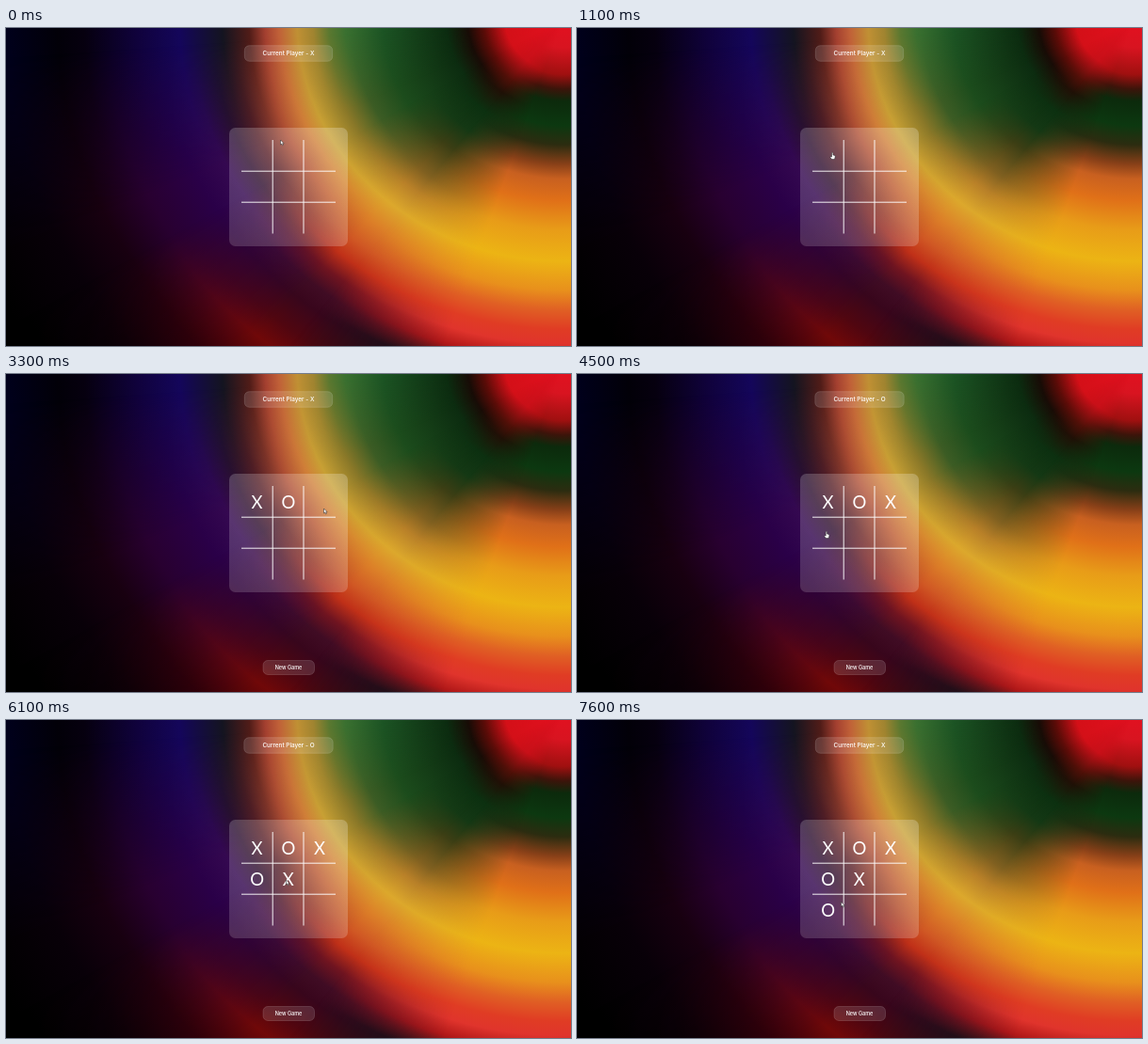
Recreate the animation shown at these times as an HTML page. Size 600 by 338 pixels, loop 8 s.

```html
<!DOCTYPE html>
<html lang="en">
<head>
<meta charset="utf-8">
<title>Noughts and crosses</title>
<style>
  html, body { margin: 0; width: 100%; height: 100%; overflow: hidden; background: #000; }
  #stage { position: relative; width: 600px; height: 338px; overflow: hidden; }
  #stage > * { position: absolute; inset: 0; }

  /* Elliptical colour rings, blended by direction from the top right */
  .ring {
    background: radial-gradient(566px 516px at 592px -10px, var(--stops));
    -webkit-mask-image: conic-gradient(at 592px -10px, var(--fade));
    mask-image: conic-gradient(at 592px -10px, var(--fade));
  }
  .left {
    --fade: #000, #000;
    --stops: #e41020 0%, #d41018 11%, #5c0c08 15%, #180c06 18%, #0c2c10 22%, #1c5424 34%,
      #3a7030 41%, #5a7830 44%, #a08430 47%, #c09034 50%, #c06038 53.5%, #a44030 56%,
      #501c18 59%, #141420 64%, #14065a 72%, #10023c 80%, #06000f 90%, #020008 95%, #00001c 105%;
  }
  .purple {
    --fade: #000 247deg, transparent 266deg;
    --stops: #e41020 0%, #d41018 11%, #5c0c08 15%, #180c06 18%, #0c2c10 22%, #1c4c1c 34%,
      #3c5c24 40%, #8a7828 45%, #c8a034 50%, #d08038 53%, #b05034 57%, #5a2028 62%,
      #301030 66%, #340850 70%, #2a0048 76%, #280030 86%, #180010 95%, #080008 105%, #000 120%;
  }
  .diagonal {
    --fade: #000 224deg, transparent 241deg;
    --stops: #e41020 0%, #c81018 11%, #501008 16%, #201006 19%, #0c3010 24%, #143814 29%,
      #3c3e14 34%, #806020 41%, #b88028 45%, #dca82c 50%, #dc8028 55%, #d05824 60%,
      #c03018 64%, #701420 68%, #400c24 72%, #38061c 76%, #500610 82%, #700808 87%,
      #380008 96%, #100006 108%, #000 120%;
  }
  .down {
    --fade: #000 200deg, transparent 220deg;
    --stops: #e41020 0%, #d81420 6%, #a01010 11.5%, #3c140a 14.5%, #0c2a0c 17%, #0c3810 22%,
      #2c2c10 26%, #884018 30%, #c86020 33%, #e07018 37.5%, #e89c18 43.5%, #ecb414 50%,
      #e8901c 56%, #e06024 60%, #e03c24 64%, #e0342c 67%, #b01818 70.5%, #101414 75%;
  }

  text { fill: #fff; text-anchor: middle; }
  .label { font: 500 6.4px Inter, sans-serif; }
  .small { font: 500 5.5px Inter, sans-serif; }
  .mark { font: 400 18.5px Lato, sans-serif; }
  .glass { fill: #fff; fill-opacity: .13; stroke: #fff; stroke-opacity: .2; stroke-width: .7; }
  .pointer { fill: #fff; stroke: #222; stroke-width: .5; }
</style>
</head>
<body>
<div id="stage">
  <div class="ring left"></div>
  <div class="ring purple"></div>
  <div class="ring diagonal"></div>
  <div class="ring down"></div>
  <svg width="600" height="338" viewBox="0 0 600 338">
    <defs>
      <linearGradient id="sheen" x1="0" y1="1" x2="1" y2="0">
        <stop offset="0" stop-color="#fff" stop-opacity=".16"/>
        <stop offset="1" stop-color="#fff" stop-opacity=".23"/>
      </linearGradient>
    </defs>
    <rect id="pill" class="glass" y="18.7" height="16.6" rx="5"/>
    <text id="status" class="label" x="300" y="29.2"></text>
    <rect x="237" y="106" width="126" height="126" rx="6.5" fill="url(#sheen)"/>
    <path d="M283.2 119V218.5M316 119V218.5M250 152.2H350M250 185.2H350" stroke="#fff" stroke-opacity=".92"/>
    <g id="marks"></g>
    <g id="newGame">
      <rect class="glass" x="273" y="304.5" width="54.5" height="15" rx="5"/>
      <text class="small" x="300" y="313.9">New Game</text>
    </g>
    <path id="arrow" class="pointer" d="M0 0V5L1.2 4 2 5.8 2.9 5.4 2.1 3.7H3.6Z"/>
    <path id="hand" class="pointer" d="M-.8 -3.2Q0 -4.2.6 -3.2V-1L2.5 -.5Q3 -.2 2.9 1L2.2 3.6H-.8L-2.4 1.2Q-2.4 .2-.8 1Z"/>
  </svg>
</div>
<script>
const LOOP = 8000;

// [time, player, column, row]
const moves = [
  [1300, "X", 0, 0], [2300, "O", 1, 0], [3900, "X", 2, 0],
  [5000, "O", 0, 1], [6100, "X", 1, 1], [7400, "O", 0, 2]
];

// [time, x, y, shape]; the pointer jumps from one place to the next
const steps = [
  [0, 291.5, 119, "arrow"], [200, 288, 122, "arrow"], [300, 284, 127, "arrow"],
  [700, 279, 132, "hand"], [800, 275, 135, "hand"], [900, 272, 136, "hand"],
  [1100, 271.3, 136, "hand"], [1300, 270, 136, "arrow"], [1800, 277, 138, "arrow"],
  [2100, 288, 140, "hand"], [2200, 294, 141, "hand"], [2300, 293.2, 140, "arrow"],
  [2800, 305, 142, "arrow"], [2900, 320, 143, "arrow"], [3300, 337.5, 143, "arrow"],
  [3400, 336, 143, "hand"], [3900, 336, 141, "arrow"], [4100, 316, 152, "arrow"],
  [4400, 272, 169, "hand"], [4500, 265, 171, "hand"], [5000, 265, 169, "arrow"],
  [5500, 276, 169, "arrow"], [5800, 288, 170, "hand"], [5900, 295, 171, "hand"],
  [6000, 298, 172, "hand"], [6100, 297.5, 170, "arrow"], [6500, 291, 179, "arrow"],
  [6600, 278, 193, "hand"], [7100, 269, 203, "hand"], [7400, 270, 201, "arrow"],
  [7600, 280.5, 193.3, "arrow"]
];

const el = id => document.getElementById(id);

const marks = moves.map(([, player, col, row]) => {
  const text = document.createElementNS("http://www.w3.org/2000/svg", "text");
  text.setAttribute("class", "mark");
  text.setAttribute("x", 266.6 + col * 33.2);
  text.setAttribute("y", 142.8 + row * 33.1);
  text.textContent = player;
  el("marks").append(text);
  return text;
});

const show = (node, on) => { node.style.display = on ? "" : "none"; };

function render(time) {
  const played = moves.filter(move => move[0] <= time).length;
  marks.forEach((mark, i) => show(mark, i < played));
  show(el("newGame"), played > 0);

  const player = "XO"[played % 2];
  const width = player === "X" ? 93.4 : 94.4;
  el("status").textContent = "Current Player - " + player;
  el("pill").setAttribute("x", 300 - width / 2);
  el("pill").setAttribute("width", width);

  const [, x, y, shape] = steps.filter(step => step[0] <= time).pop();
  for (const name of ["arrow", "hand"]) {
    show(el(name), name === shape);
    el(name).setAttribute("transform", `translate(${x} ${y})`);
  }
}

const start = performance.now();
function tick() {
  render((performance.now() - start) % LOOP);
  requestAnimationFrame(tick);
}
tick();
</script>
</body>
</html>
```
